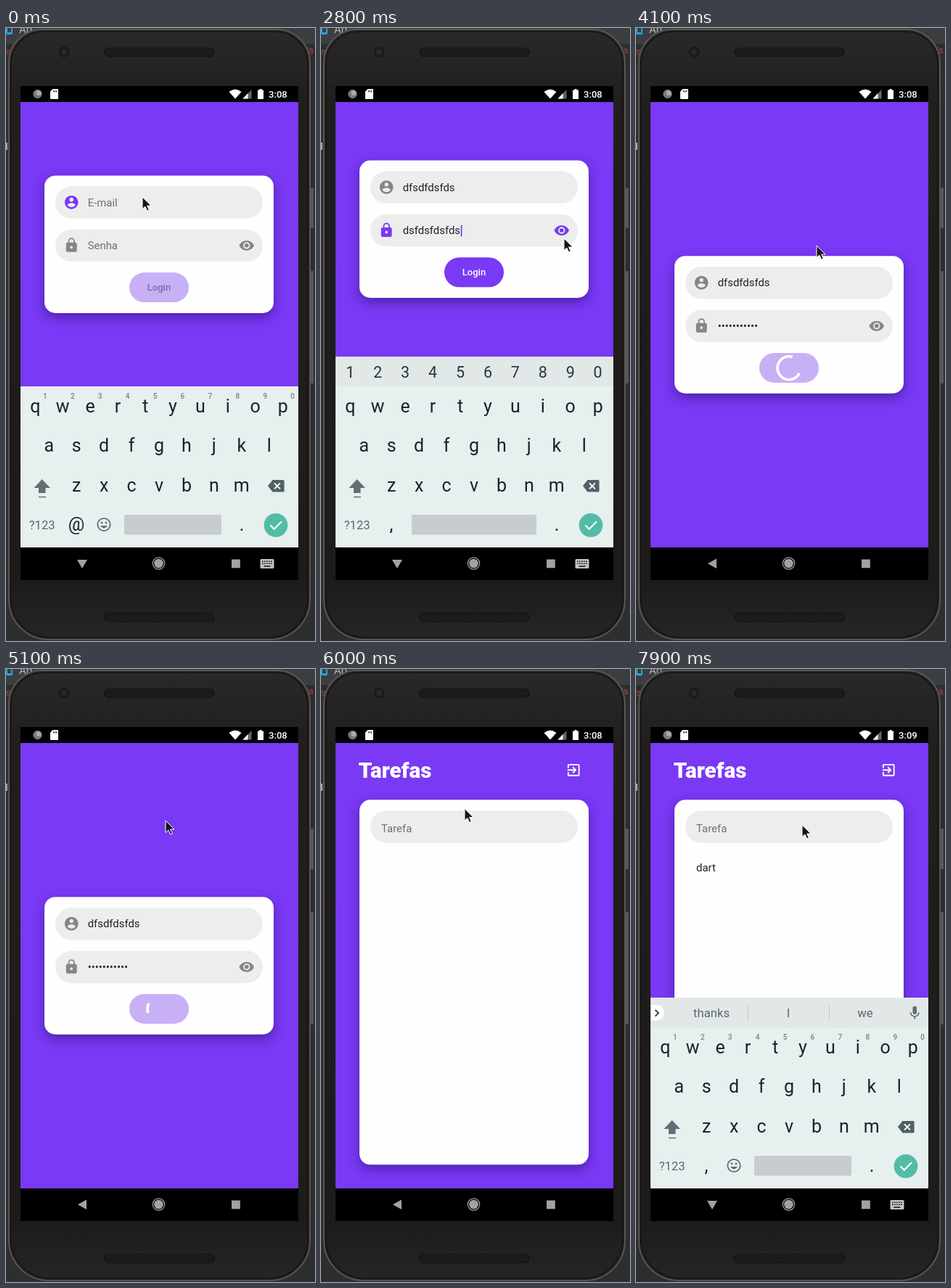
These frames come from a looping animation (426 by 845 pixels, 8000 ms). An HTML page:

```html
<!DOCTYPE html>
<html lang="pt">
<head>
<meta charset="utf-8">
<title>Login</title>
<style>
  html, body { margin: 0; width: 100%; height: 100%; overflow: hidden; background: #2c2e30; }
  svg { display: block; width: 100vw; height: 100vh; font-family: Roboto, sans-serif; }
  .card { filter: drop-shadow(0 6px 8px rgba(20, 0, 70, .42)); }
  .body { font-size: 14.9px; fill: #222; }
  .hint { font-size: 14.9px; fill: #6f6f6f; }
  .key { font-size: 25px; fill: #10262e; text-anchor: middle; }
  .digit { font-size: 21.5px; fill: #22383f; text-anchor: middle; }
  .mini { font-size: 10px; font-weight: 500; fill: #788286; text-anchor: middle; }
  .word { font-size: 16.7px; fill: #5c686d; text-anchor: middle; }
</style>
</head>
<body>
<svg id="stage" viewBox="0 0 426 845"></svg>
<script>
const LOOP = 8000, STEP = 100;
const PURPLE = '#7939f5', GREY = '#858585', KEY = '#5f6f75';
const EMAIL = 'dfsdfdsfds', PASSWORD = 'dsfdsfdsfds', TASK = 'dart';

const ICONS = {
  user: 'M12 2C6.48 2 2 6.48 2 12s4.48 10 10 10 10-4.48 10-10S17.52 2 12 2zm0 3c1.66 0 3 1.34 3 3s-1.34 3-3 3-3-1.34-3-3 1.34-3 3-3zm0 14.2c-2.5 0-4.71-1.28-6-3.22.03-1.99 4-3.08 6-3.08s5.97 1.09 6 3.08c-1.29 1.94-3.5 3.22-6 3.22z',
  lock: 'M18 8h-1V6A5 5 0 0 0 7 6v2H6a2 2 0 0 0-2 2v10a2 2 0 0 0 2 2h12a2 2 0 0 0 2-2V10a2 2 0 0 0-2-2zm-6 9a2 2 0 1 1 0-4 2 2 0 0 1 0 4zm3.1-9H8.9V6a3.1 3.1 0 0 1 6.2 0z',
  eye: 'M12 4.5C7 4.5 2.73 7.61 1 12c1.73 4.39 6 7.5 11 7.5s9.27-3.11 11-7.5c-1.73-4.39-6-7.5-11-7.5zM12 17a5 5 0 1 1 0-10 5 5 0 0 1 0 10zm0-8a3 3 0 1 0 0 6 3 3 0 0 0 0-6z',
  exit: 'M10.1 15.6L11.5 17l5-5-5-5-1.4 1.4L12.7 11H3v2h9.7zM19 3H5a2 2 0 0 0-2 2v4h2V5h14v14H5v-4H3v4a2 2 0 0 0 2 2h14a2 2 0 0 0 2-2V5a2 2 0 0 0-2-2z',
  mic: 'M12 14a3 3 0 0 0 3-3V5a3 3 0 0 0-6 0v6a3 3 0 0 0 3 3zm5.3-3a5.3 5.3 0 0 1-10.6 0H5a7 7 0 0 0 6 6.7V21h2v-3.3A7 7 0 0 0 19 11z'
};

const rect = (x, y, w, h, fill, r = 0, extra = '') =>
  `<rect x="${x}" y="${y}" width="${w}" height="${h}" rx="${r}" fill="${fill}" ${extra}/>`;
const circle = (x, y, r, fill, extra = '') =>
  `<circle cx="${x}" cy="${y}" r="${r}" fill="${fill}" ${extra}/>`;
const path = (d, fill, extra = '') => `<path d="${d}" fill="${fill}" ${extra}/>`;
const line = (d, color, width, extra = '') =>
  path(d, 'none', `stroke="${color}" stroke-width="${width}" ${extra}`);
const text = (x, y, cls, str, extra = '') =>
  `<text x="${x}" y="${y}" class="${cls}" ${extra}>${str}</text>`;
const icon = (name, cx, cy, fill, id = '') =>
  path(ICONS[name], fill, `id="${id}" transform="translate(${cx - 11.2} ${cy - 11.2}) scale(.93)"`);
const group = (id, content, extra = '') => `<g id="${id}" ${extra}>${content}</g>`;
const field = y => rect(68, y, 286, 44.5, '#ededec', 22.2);

const keyX = i => 40.3 + i * 37.93;
const row = (chars, first, y, cls = 'key') =>
  [...chars].map((c, i) => text(keyX(first + i), y, cls, c)).join('');

function desktop() {
  return rect(0, 0, 426, 845, '#2c2e30') + rect(0, 0, 426, 22, '#3b3e40') +
    rect(0, 0, 9, 9, '#27a4dc', 2) + rect(2, 0, 5, 6, '#34414a') +
    text(18, 7, '', 'Ap', 'font-size="15" fill="#b5b7b8"') +
    text(0, 37, '', 's', 'font-size="13" fill="#a84340"') +
    text(414, 35, '', 'is', 'font-size="13" fill="#b54444"') +
    rect(0, 158, 2, 10, '#a5a5a5') + rect(420, 220, 4, 56, '#55575a', 1) +
    rect(420, 335, 4, 155, '#55575a', 1);
}

function phone() {
  const speaker = y => rect(135, y, 153, 13, '#161514', 6.5) +
    rect(137, y + 1, 149, 11, 'url(#mesh)', 5.5);
  return path('M4 48A46 46 0 0 1 50 2H373A46 46 0 0 1 419 48V788A55 55 0 0 1 364 843H59A55 55 0 0 1 4 788Z',
      'url(#shell)', 'stroke="#575654" stroke-width="2"') +
    line('M7 50A44 44 0 0 1 51 5H372A44 44 0 0 1 416 50V787A53 53 0 0 1 363 840H60A53 53 0 0 1 7 787Z', '#191817', 2) +
    speaker(27) + speaker(806) +
    circle(80, 33, 7.5, '#1b1a1a') + circle(80, 33, 4, '#242a33');
}

function statusBar() {
  return rect(20, 80, 383, 22, '#000') +
    circle(43.5, 91, 5.7, '#777', 'stroke="#aaa" stroke-dasharray="1.5 1"') + circle(45, 89.5, 3.5, '#aaa') +
    path('M64.5 84H71a1 1 0 0 1 1 1V97a1 1 0 0 1-1 1H62a1 1 0 0 1-1-1V87.5Z', '#fff') +
    line('M65.5 86v2.5M67.5 86v2.5M69.5 86v2.5', '#000', .9) +
    path('M307.5 88Q316 81 324.5 88L316 97.5Z', '#fff') +
    path('M326.5 97.5L338.5 85V97.5Z', '#666') + path('M326.5 97.5L333.5 90V97.5Z', '#fff') +
    path('M347 85.5H349.5V84H352.5V85.5H355V98H347Z', '#fff') +
    text(362, 95.8, '', '3:08', 'id="clock" font-size="13.1" font-weight="500" fill="#fff"');
}

function navBar() {
  const grey = '#a2a2a2';
  return rect(20, 716, 383, 45, '#000') +
    path('M98 733H112L105 745Z', grey, 'id="navDown"') +
    path('M111 731.5V745L99 738.2Z', grey, 'id="navBack"') +
    circle(210.5, 738, 8.2, 'none', `stroke="${grey}" stroke-width="1.2"`) + circle(210.5, 738, 6.3, grey) +
    rect(311, 732.5, 11.8, 11.8, grey) +
    group('navKeys', rect(350.5, 732, 19, 13, '#c2c2c2', 1.5) +
      line('M353 735.2H367M353 738.2H367', '#111', 1.5, 'stroke-dasharray="1.7 1.3"') +
      line('M355.5 742H364.5', '#111', 1.5));
}

function loginCard() {
  return rect(53, 0, 316, 189.5, '#fefefe', 15, 'class="card"') + field(14.7) + field(74.2) +
    icon('user', 90.3, 37, GREY, 'userIcon') + icon('lock', 90.3, 96.2, GREY, 'lockIcon') +
    icon('eye', 331.8, 96.5, GREY, 'eyeIcon') +
    text(112.7, 42.3, 'body', '', 'id="email"') + text(112.7, 101.8, 'body', '', 'id="password"') +
    rect(170, 133.7, 82, 41, '#c8b0f7', 20.5, 'id="button"') +
    rect(170, 133.7, 82, 41, '#000', 20.5, 'id="press"') +
    text(211, 158.6, '', 'Login', 'id="label" font-size="13" font-weight="500" text-anchor="middle"') +
    line('', '#fff', 3.7, 'id="spinner"') +
    rect(0, 0, 1.7, 15.5, PURPLE, 0, 'id="caret"');
}

function taskPage() {
  return rect(20, 102, 383, 614, PURPLE) +
    text(51.7, 150, '', 'Tarefas', 'font-size="29.6" font-weight="900" fill="#fff"') +
    icon('exit', 348.3, 139.3, '#fff') +
    rect(53, 180.3, 316, 503, '#fefefe', 15, 'class="card"') + field(195.3) +
    text(83, 225, 'hint', 'Tarefa', 'id="task"') + text(83, 278.5, 'body', TASK, 'id="item"') +
    rect(83, 212, 1.7, 15.5, PURPLE, 0, 'id="taskCaret"');
}

function keyboard() {
  const minis = [...'1234567890'].map((c, i) => text(keyX(i) + 13.5, 510.5, 'mini', c)).join('');
  const smiley = circle(135, 684.5, 8.7, 'none', `stroke="${KEY}" stroke-width="1.8"`) +
    circle(132, 682, 1.4, KEY) + circle(138, 682, 1.4, KEY) + path('M130 686H140Q135 693 130 686Z', KEY);
  const words = path('M20 463H28A10.8 10.8 0 0 1 28 484.6H20Z', '#fff') +
    line('M26.5 470L31 474.3L26.5 478.6', '#333', 1.8) +
    text(104, 480.3, 'word', 'thanks') + text(210, 480.3, 'word', 'I') + text(316, 480.3, 'word', 'we') +
    line('M154.5 463V486M266.5 463V486', '#c3cacb', 1) + icon('mic', 384.3, 474.2, KEY);
  return rect(20, 494, 383, 222, '#e8efef') +
    group('topRow', rect(20, 453, 383, 41, '#e2e8e7')) +
    group('digits', row('1234567890', 0, 482.3, 'digit')) + group('words', words) + group('minis', minis) +
    row('qwertyuiop', 0, 529.5) + row('asdfghjkl', .5, 584.3) + row('zxcvbnm', 1.5, 639.3) +
    path('M49.7 622L61 634H54.5V641H45V634H38.5Z', KEY) + line('M45 646.5H55', KEY, 1.5) +
    path('M367.5 623H382a1.6 1.6 0 0 1 1.6 1.6V638a1.6 1.6 0 0 1-1.6 1.6H367.5L361 631.3Z', '#4f6067') +
    line('M370 627.3L378 635.3M378 627.3L370 635.3', '#fff', 1.9) +
    text(49.7, 691, 'word', '?123') + text(97, 693, 'key', '@', 'id="mark"') + group('smiley', smiley) +
    rect(163, 671, 134, 27.5, '#c7ccce', 2, 'id="space"') + text(325, 693, 'key', '.') +
    circle(372, 685.3, 16.4, '#53bca6') + line('M364.5 685.5L369.7 690.7L380 680.3', '#fff', 2.1);
}

document.getElementById('stage').innerHTML = `<defs>
  <linearGradient id="shell" x2="0" y2="1"><stop stop-color="#2a2927"/><stop offset=".12" stop-color="#211f1d"/>
    <stop offset=".9" stop-color="#1e1c1a"/><stop offset="1" stop-color="#272523"/></linearGradient>
  <pattern id="mesh" width="4" height="4" patternUnits="userSpaceOnUse">
    <circle cx="1" cy="1" r=".8" fill="#33302d"/><circle cx="3" cy="3" r=".8" fill="#33302d"/></pattern>
  <clipPath id="app"><rect x="20" y="102" width="383" height="614"/></clipPath>
  <clipPath id="glass"><rect x="20" y="102" width="383" height="659"/></clipPath></defs>` +
  desktop() + phone() + statusBar() +
  `<g clip-path="url(#app)">${rect(20, 102, 383, 614, PURPLE)}${group('login', loginCard())}${group('page', taskPage())}</g>` +
  navBar() + `<g clip-path="url(#glass)">${group('keyboard', keyboard())}</g>` +
  path('M0 0V16.5L3.8 13L6.7 19L9.3 17.9L6.6 12H12Z', '#161616', 'id="mouse" stroke="#fff" stroke-width="1"');

const el = {};
document.querySelectorAll('[id]').forEach(n => el[n.id] = n);
const set = (id, attrs) => Object.entries(attrs).forEach(([k, v]) => el[id].setAttribute(k, v));
const show = (id, on) => set(id, { visibility: on ? 'inherit' : 'hidden' });
const clamp = v => Math.max(0, Math.min(1, v));
const between = (t, a, b) => t >= a && t < b;

function bezier(x1, y1, x2, y2) {
  const at = (s, a, b) => 3 * a * s * (1 - s) ** 2 + 3 * b * s * s * (1 - s) + s ** 3;
  return x => {
    let lo = 0, hi = 1;
    for (let i = 0; i < 24; i++) {
      const mid = (lo + hi) / 2;
      if (at(mid, x1, x2) < x) lo = mid; else hi = mid;
    }
    return at(lo, y1, y2);
  };
}
const easeIn = bezier(.42, 0, 1, 1), fastOutSlowIn = bezier(.4, 0, .2, 1);

// time, x, y
const MOUSE = [
  [0, 188, 233], [600, 188, 233], [900, 176, 288], [1200, 178, 292], [1900, 178, 292], [2200, 368, 285],
  [2400, 338, 276], [2600, 335, 274], [2800, 335, 290], [3000, 330, 285], [3100, 260, 308], [3300, 222, 330],
  [3500, 216, 336], [3700, 235, 336], [4100, 249, 300], [5000, 220, 209], [5100, 220, 209], [5800, 201, 190],
  [6200, 195, 195], [6500, 190, 206], [6700, 188, 207], [7000, 188, 207], [7300, 330, 213], [7400, 345, 217],
  [7600, 345, 217], [7900, 229, 215]
];

function mouseAt(t) {
  const i = MOUSE.findIndex(k => k[0] >= t);
  if (i < 1) return MOUSE[0].slice(1);
  const [t0, x0, y0] = MOUSE[i - 1], [t1, x1, y1] = MOUSE[i], p = (t - t0) / (t1 - t0);
  return [x0 + (x1 - x0) * p, y0 + (y1 - y0) * p];
}

const typed = (word, t, start, end) =>
  t < start ? '' : word.slice(0, Math.round(1 + clamp((t - start) / (end - start)) * (word.length - 1)));

function fill(id, value, hint) {
  el[id].textContent = value || hint;
  el[id].setAttribute('class', value ? 'body' : 'hint');
  return value ? el[id].getComputedTextLength() + .5 : 0;
}

function spinnerPath(t) {
  const turns = Math.max(0, (t - 3577) / 1370), k = Math.floor(turns), u = turns - k;
  const head = fastOutSlowIn(clamp(u * 2)), tail = fastOutSlowIn(clamp(u * 2 - 1));
  const start = -90 + tail * 270 + u * 306 - k * 144, sweep = Math.max(2, (head - tail) * 270);
  const point = a => `${211 + 16 * Math.cos(a * Math.PI / 180)} ${154.5 + 16 * Math.sin(a * Math.PI / 180)}`;
  return `M${point(start)}A16 16 0 ${sweep > 180 ? 1 : 0} 1 ${point(start + sweep)}`;
}

function drawLogin(t) {
  const onEmail = t < 1100, onPassword = between(t, 1100, 3600);
  const loading = between(t, 3600, 5600), enabled = between(t, 1900, 3600);
  const secret = typed(PASSWORD, t, 1600, 2200);
  const emailEnd = fill('email', typed(EMAIL, t, 400, 900), 'E-mail');
  const passwordEnd = fill('password', between(t, 2600, 3000) ? secret : '•'.repeat(secret.length), 'Senha');
  set('login', { transform: `translate(0 ${t < 1200 ? 203.4 : t < 3600 ? 182.5 : 314.2})` });
  set('userIcon', { fill: onEmail ? PURPLE : GREY });
  for (const id of ['lockIcon', 'eyeIcon']) set(id, { fill: onPassword ? PURPLE : GREY });
  set('button', { fill: enabled ? PURPLE : '#c8b0f7' });
  set('press', { opacity: .17 * clamp(1 - Math.abs(t - 3700) / 400) });
  set('label', { fill: enabled ? '#fff' : '#7d6a9e' });
  show('label', !loading);
  show('spinner', loading);
  set('spinner', { d: spinnerPath(t) });
  show('caret', between(t, 100, 3600));
  set('caret', { x: 112.9 + (onEmail ? emailEnd : passwordEnd), y: onEmail ? 29.5 : 89.3 });
}

function drawPage(t) {
  const p = clamp((t - 5635) / 300);
  show('page', p > 0);
  set('page', { opacity: easeIn(p), transform: `translate(0 ${153 * (1 - fastOutSlowIn(p))})` });
  const end = fill('task', t < 7600 ? typed(TASK, t, 6900, 7200) : '', 'Tarefa');
  show('item', t >= 7600);
  show('taskCaret', between(t, 6600, 7600));
  set('taskCaret', { x: 83.1 + end });
}

function drawKeyboard(t) {
  const mode = t < 1200 ? 'email' : t < 6000 ? 'digits' : 'words';
  const out = clamp((t - 3500) / 400), away = 1 - clamp((t - 6500) / 250);
  const leaving = t < 6000, y = leaving ? 56 * out ** 2 : 25 * away ** 2;
  set('keyboard', {
    opacity: clamp(1 - (leaving ? 1.12 * out ** 2 : 1.5 * away ** 2)),
    transform: `translate(0 ${y})`
  });
  show('topRow', mode !== 'email');
  show('digits', mode === 'digits');
  show('words', mode === 'words');
  show('minis', mode !== 'digits');
  show('smiley', mode !== 'digits');
  el.mark.textContent = mode === 'email' ? '@' : ',';
  set('space', mode === 'digits' ? { x: 125, width: 172 } : { x: 163, width: 134 });
  const open = t < 3600 || t >= 6600;
  show('navDown', open);
  show('navKeys', open);
  show('navBack', !open);
}

function frame(now) {
  const t = Math.floor(now % LOOP / STEP) * STEP;
  drawLogin(t);
  drawPage(t);
  drawKeyboard(t);
  el.clock.textContent = t < 6500 ? '3:08' : '3:09';
  set('mouse', { transform: `translate(${mouseAt(t)})` });
  requestAnimationFrame(frame);
}
frame(performance.now());
</script>
</body>
</html>
```
